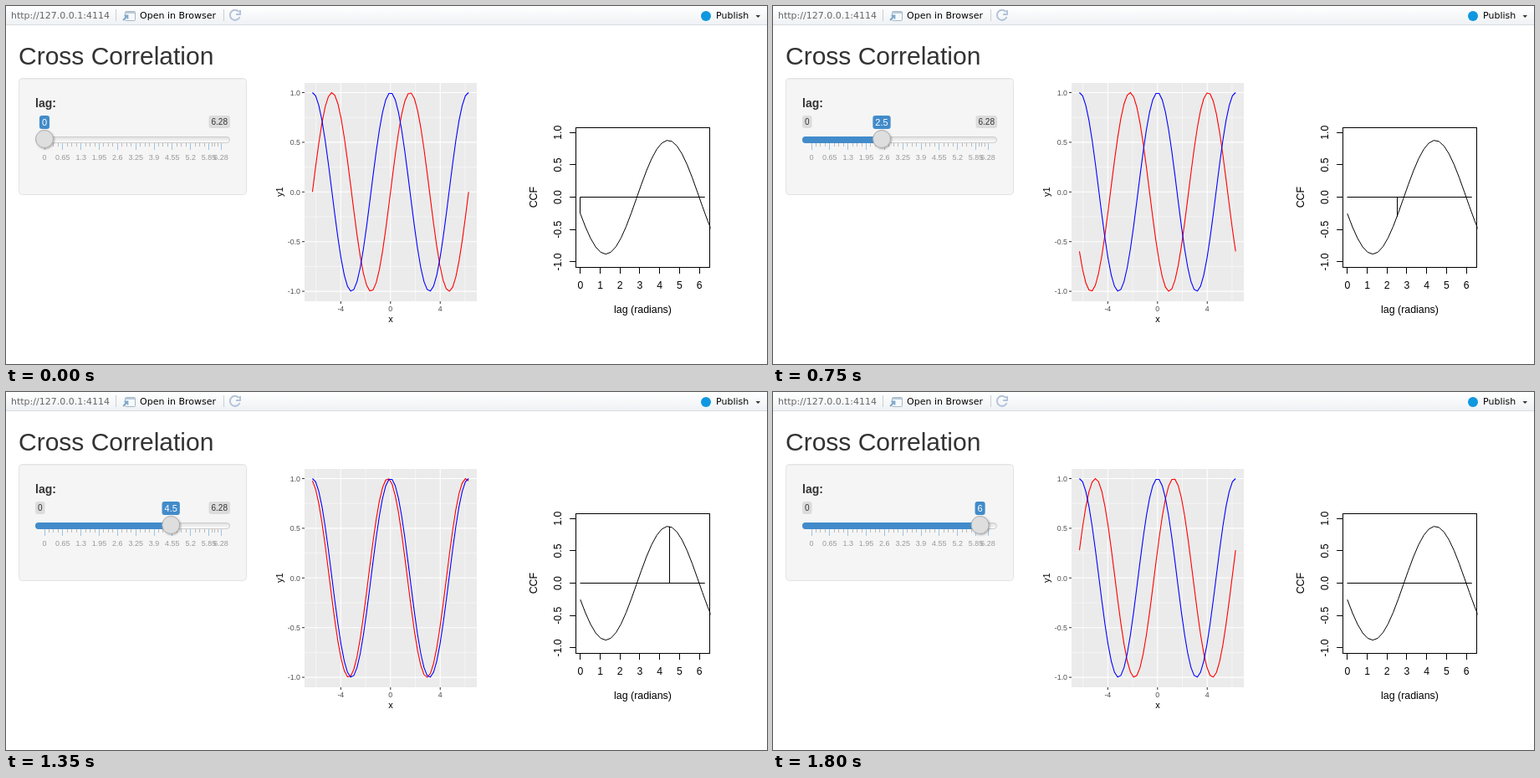
An HTML page that plays this animation: 910x428 px, repeating every 1950 ms.

```html
<!DOCTYPE html>
<html lang="en">
<head>
<meta charset="utf-8">
<title>Cross Correlation</title>
<style>
  html, body { margin: 0; width: 100%; height: 100%; overflow: hidden; background: #fff; }
  svg { display: block; font-family: "Liberation Sans", Arial, sans-serif; }
  .toolbar { font: 11px "DejaVu Sans", sans-serif; }
</style>
</head>
<body>
<svg id="stage" width="910" height="428" viewBox="0 0 910 428">
  <defs>
    <linearGradient id="barFill" x2="0" y2="1">
      <stop stop-color="#fff"/><stop offset="1" stop-color="#eff2f5"/>
    </linearGradient>
    <linearGradient id="trackFill" x2="0" y2="1">
      <stop stop-color="#dedede"/><stop offset="1" stop-color="#fff"/>
    </linearGradient>
    <clipPath id="ccfClip"><path d="M681 145H842.5V313H681z"/></clipPath>
    <filter id="shadow" x="-30%" y="-30%" width="170%" height="170%">
      <feDropShadow dx="1" dy="1" stdDeviation="1.2" flood-opacity=".3"/>
    </filter>
  </defs>

  <g class="toolbar">
    <rect width="910" height="22" fill="url(#barFill)"/>
    <path d="M0 22.5H910" stroke="#d9dde0"/>
    <path d="M131.5 4V18M260.5 4V18" stroke="#ccd0d3"/>
    <text x="6" y="15" fill="#666">http://127.0.0.1:4114</text>
    <rect x="142.5" y="6.5" width="12" height="11" rx="1" fill="#f7fafc" stroke="#a9b7c4"/>
    <path d="M143 8H154" stroke="#b9cbd9" stroke-width="2"/>
    <path d="M140 17L145 12M141.5 11.5H145.5V15.5" fill="none" stroke="#7fa9cc" stroke-width="1.8"/>
    <text x="160" y="15">Open in Browser</text>
    <path d="M278.5 7A6 6 0 1 0 279.5 13M280 5V10H275" fill="none" stroke="#b4c3d8" stroke-width="2"/>
    <circle cx="837" cy="12" r="6" fill="#0f97e0"/>
    <text x="849" y="15">Publish</text>
    <path d="M896.5 11H902L899.25 14z" fill="#333"/>
  </g>

  <text x="15" y="70" font-size="30" fill="#333">Cross Correlation</text>

  <rect x="15.5" y="86.5" width="272" height="139" rx="4" fill="#f5f5f5" stroke="#e3e3e3"/>
  <path d="M18 87.5H285" stroke="#ececec"/>
  <text x="35" y="121" font-size="14" font-weight="bold" fill="#333">lag:</text>
  <rect x="35.5" y="156.5" width="232" height="7" rx="3.5" fill="url(#trackFill)" stroke="#ccc"/>
  <g id="slider"></g>
  <g id="signals"></g>
  <g id="ccf"></g>
</svg>
<script>
const STEP_MS = 150, STEPS = 13, LAG_STEP = 0.5, MAX_LAG = 6.28;
const SAMPLE = 4 * Math.PI / 49;
const byId = id => document.getElementById(id);
const snap = v => Math.floor(v) + 0.5;

function add(parent, tag, attrs, text) {
  const node = document.createElementNS('http://www.w3.org/2000/svg', tag);
  for (const name in attrs) node.setAttribute(name, attrs[name]);
  if (text !== undefined) node.textContent = text;
  return parent.appendChild(node);
}
const line = (parent, d, stroke, width = 1) =>
  add(parent, 'path', { d, stroke, 'stroke-width': width, fill: 'none' });
const label = (parent, text, x, y, size, fill, anchor = 'middle') =>
  add(parent, 'text', { x, y, 'font-size': size, fill, 'text-anchor': anchor }, text);
const upright = (parent, text, x, y, size, fill) =>
  label(parent, text, 0, 0, size, fill).setAttribute('transform', `translate(${x} ${y}) rotate(-90)`);
const curve = (fn, start, count, toX, toY) => 'M' + Array.from({ length: count }, (_, i) => {
  const x = start + i * SAMPLE;
  return `${toX(x).toFixed(2)} ${toY(fn(x)).toFixed(2)}`;
}).join('L');

// Slider
const slider = byId('slider');
const sliderX = lag => 46 + lag * 33.6;
const bar = add(slider, 'rect', { x: 35, y: 156, height: 8, rx: 4, fill: '#428bca' });
const marks = [...Array.from({ length: 10 }, (_, i) => +(i * 0.65).toFixed(2)), MAX_LAG];
marks.forEach((mark, i) => {
  line(slider, `M${snap(sliderX(mark))} 164V172`, '#9dc4e3');
  label(slider, mark, sliderX(mark), 184.3, 9, '#999');
  if (i === marks.length - 1) return;
  for (let k = 1; k < 4; k++) {
    const x = sliderX(mark + (marks[i + 1] - mark) * k / 4);
    line(slider, `M${snap(x)} 164V168`, '#bbb');
  }
});
function badge(x, width, height, text, size, fill, color) {
  const group = add(slider, 'g', {});
  add(group, 'rect', { x, y: 131, width, height, rx: 3, fill });
  label(group, text, x + width / 2, 142.4, size, color);
  return group;
}
const minBadge = badge(35, 11.6, 15, '0', 10, '#dcdcdc', '#333');
const maxBadge = badge(242.5, 25.5, 15, '6.28', 10, '#dcdcdc', '#333');
const valueBox = add(slider, 'rect', { y: 131, height: 16, rx: 3, fill: '#428bca' });
const valueText = label(slider, '', 0, 143, 11, '#fff');
const handle = add(slider, 'circle', {
  cy: 159, r: 10.5, fill: '#dedede', stroke: '#aaa', filter: 'url(#shadow)'
});

// Signal plot
const signals = byId('signals');
const sigX = x => 459.8 + x * 14.86, sigY = y => 222.3 - y * 118.8;
add(signals, 'rect', { x: 357, y: 92, width: 206, height: 261, fill: '#ebebeb' });
for (const x of [-6, -2, 2, 6]) line(signals, `M${sigX(x)} 92V353`, '#fff', 0.5);
for (const y of [-0.75, -0.25, 0.25, 0.75]) line(signals, `M357 ${sigY(y)}H563`, '#fff', 0.5);
for (const x of [-4, 0, 4]) {
  line(signals, `M${sigX(x)} 92V353`, '#fff', 1.07);
  line(signals, `M${sigX(x)} 353V356`, '#333');
  label(signals, x, sigX(x), 365, 8.8, '#4d4d4d');
}
for (const y of [-1, -0.5, 0, 0.5, 1]) {
  line(signals, `M357 ${sigY(y)}H563`, '#fff', 1.07);
  line(signals, `M354 ${sigY(y)}H357`, '#333');
  label(signals, y.toFixed(1), 352, sigY(y) + 3.2, 8.8, '#4d4d4d', 'end');
}
label(signals, 'x', 460, 378, 11, '#000');
upright(signals, 'y1', 331, 222.3, 11, '#000');
const shifted = line(signals, '', '#f00', 1.1);
line(signals, curve(Math.cos, -2 * Math.PI, 50, sigX, sigY), '#00f', 1.1);

// Cross-correlation plot
const ccf = byId('ccf');
const ccfX = x => 686.8 + x * 23.72, ccfY = y => 228.6 - y * 77.3;
const correlation = lag => 0.88 * Math.sin(lag - 2.85);
add(ccf, 'rect', { x: 681.5, y: 145.5, width: 160, height: 167, fill: 'none', stroke: '#000' });
for (let x = 0; x <= 6; x++) {
  line(ccf, `M${snap(ccfX(x))} 313V320`, '#000');
  label(ccf, x, ccfX(x), 338, 12.2, '#000');
}
for (const y of [-1, -0.5, 0, 0.5, 1]) {
  line(ccf, `M674 ${snap(ccfY(y))}H681`, '#000');
  upright(ccf, y.toFixed(1), 664, ccfY(y), 12.2, '#000');
}
label(ccf, 'lag (radians)', 761.5, 367, 12.4, '#000');
upright(ccf, 'CCF', 635, 228.6, 12.4, '#000');
line(ccf, `M686.5 228.5H${ccfX(MAX_LAG)}`, '#000');
line(ccf, curve(correlation, 0, 27, ccfX, ccfY), '#000').setAttribute('clip-path', 'url(#ccfClip)');
const stem = line(ccf, '', '#000');

function show(lag) {
  const x = sliderX(lag), width = lag % 1 ? 21.3 : 12.1;
  bar.setAttribute('width', lag ? x - 35 : 0);
  handle.setAttribute('cx', x);
  valueBox.setAttribute('x', x - width / 2);
  valueBox.setAttribute('width', width);
  valueText.setAttribute('x', x);
  valueText.textContent = lag;
  minBadge.setAttribute('visibility', x - width / 2 < 46.6 ? 'hidden' : 'visible');
  maxBadge.setAttribute('visibility', x + width / 2 > 242.5 ? 'hidden' : 'visible');
  shifted.setAttribute('d', curve(v => Math.sin(v - lag), -2 * Math.PI, 50, sigX, sigY));
  stem.setAttribute('d', `M${snap(ccfX(lag))} 228.5V${ccfY(correlation(lag))}`);
}

function tick() {
  show(Math.floor(performance.now() / STEP_MS) % STEPS * LAG_STEP);
  requestAnimationFrame(tick);
}
tick();
</script>
</body>
</html>
```
